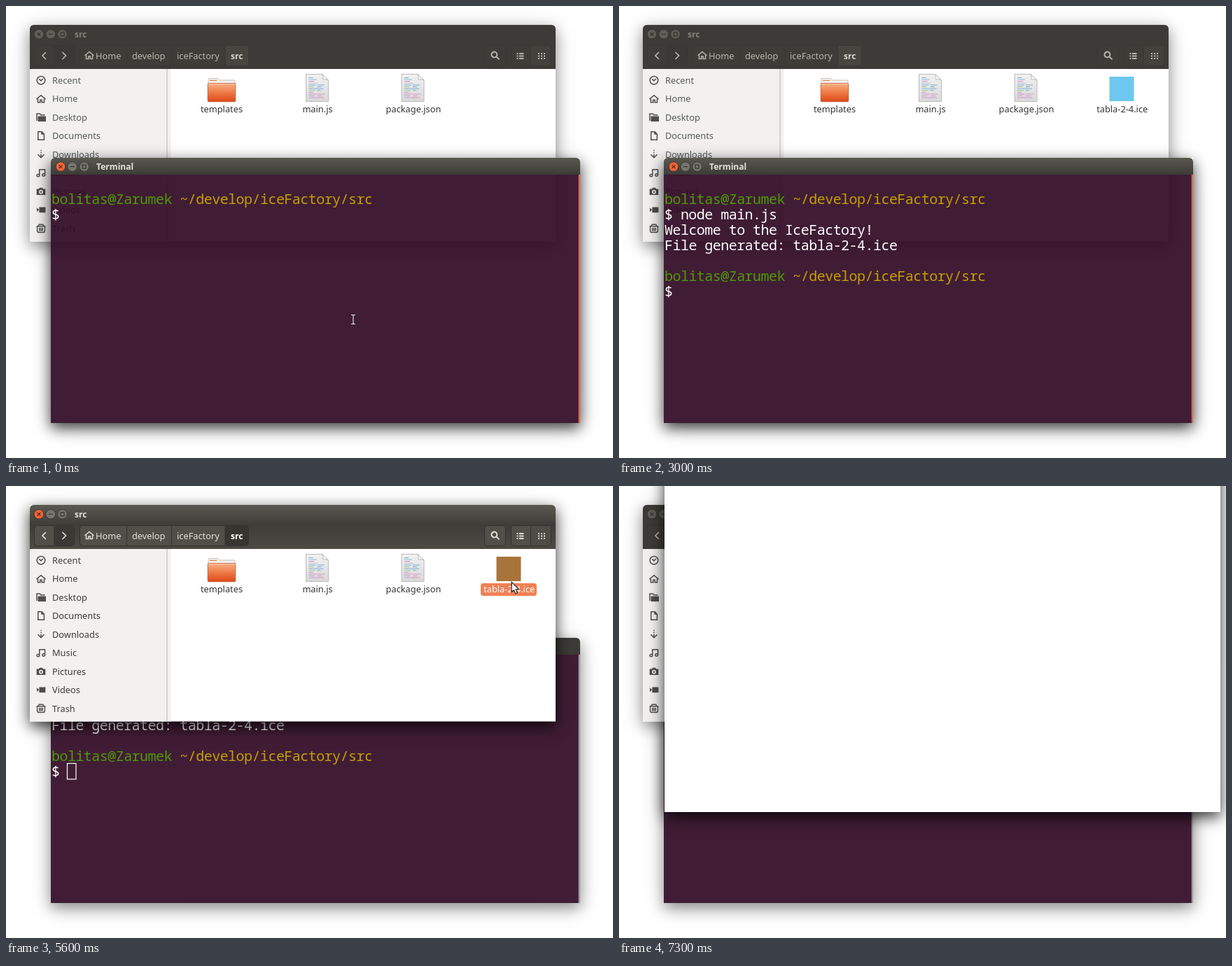
Animation, 867 px wide and 646 px high, one loop 8000 ms. Source, as an HTML page:

```html
<!DOCTYPE html>
<html lang="en">
<head>
<meta charset="utf-8">
<title>Terminal session</title>
<style>
html, body { margin: 0; width: 100%; height: 100%; overflow: hidden; background: #fff; }
svg { display: block; width: 100vw; height: 100vh; }
text { white-space: pre; font: 12.8px "Noto Sans", "Open Sans", sans-serif; }
.bold { font-weight: 700; font-size: 12.1px; }
.mono { font: 20px "Noto Sans Mono", "DejaVu Sans Mono", monospace; letter-spacing: -.54px; }
</style>
</head>
<body>
<svg viewBox="0 0 867 646" preserveAspectRatio="none">
  <defs>
    <filter id="near" x="-20%" y="-30%" width="140%" height="160%"><feGaussianBlur stdDeviation="10"/></filter>
    <filter id="far" x="-20%" y="-30%" width="140%" height="160%"><feGaussianBlur stdDeviation="18"/></filter>
    <linearGradient id="bar" x2="0" y2="1">
      <stop stop-color="#5a5950"/><stop offset=".45" stop-color="#3e3d39"/><stop offset="1" stop-color="#4b4a43"/>
    </linearGradient>
    <linearGradient id="cap" x2="0" y2="1"><stop stop-color="#595850"/><stop offset="1" stop-color="#3c3b37"/></linearGradient>
    <linearGradient id="fold" x2="0" y2="1"><stop stop-color="#f6b286"/><stop offset=".5" stop-color="#ee7a45"/><stop offset="1" stop-color="#dd4818"/></linearGradient>
    <linearGradient id="page" x2="0" y2="1"><stop stop-color="#f1f1f1"/><stop offset="1" stop-color="#d9d9d9"/></linearGradient>
    <clipPath id="body"><path d="M65 0H859V433H65Z"/></clipPath>
  </defs>
  <g id="stage"></g>
</svg>
<script>
const LOOP = 8000, COL = 11.46, ROW = 22;
const TERM = [64, 217, 756, 379], FILES = [34, 27, 751, 309.5], POPUP = [65, -80, 794, 546];
const stage = document.getElementById('stage');
const defs = document.querySelector('defs');

const rect = (x, y, w, h, fill, extra = '') =>
  `<rect x="${x}" y="${y}" width="${w}" height="${h}" fill="${fill}" ${extra}/>`;
const path = (d, fill, stroke = 'none', width = 1, extra = '') =>
  `<path d="${d}" fill="${fill}" stroke="${stroke}" stroke-width="${width}" ${extra}/>`;
const text = (x, y, s, fill, extra = '') => `<text x="${x}" y="${y}" fill="${fill}" ${extra}>${s}</text>`;
const at = (x, y, s) => `<g transform="translate(${x} ${y})">${s}</g>`;
const roundTop = (x, y, w, h, r = 6) =>
  `M${x} ${y + h}V${y + r}q0-${r} ${r}-${r}h${w - 2 * r}q${r} 0 ${r} ${r}v${h - r}Z`;

// Shadows are kept outside their own window, as windows may be translucent.
const outside = (id, [x, y, w, h]) =>
  `<clipPath id="${id}"><path clip-rule="evenodd" d="M-200-200H1100V900H-200ZM${x} ${y}h${w}v${h}h${-w}Z"/></clipPath>`;
defs.innerHTML += outside('oTerm', TERM) + outside('oFiles', FILES) + outside('oPopup', POPUP);

function shadow(id, [x, y, w, h], active) {
  const cast = (blur, opacity) => rect(x, y + 7, w, h, '#000', `filter="url(#${blur})" opacity="${opacity}"`);
  return `<g clip-path="url(#${id})">${cast('far', .14)}${cast('near', active ? .72 : .38)}</g>`;
}

function buttons(x, y, active) {
  const glyphs = ['M-2.3-2.3L2.3 2.3M2.3-2.3L-2.3 2.3', 'M-3 0H3', 'M-2.5-2.5H2.5V2.5H-2.5Z'];
  return glyphs.map((d, i) => {
    const fill = !active ? '#5f5e57' : i ? '#77766e' : '#ee6337';
    return at(x + i * 16.8, y, `<circle r="6.8" fill="${fill}" stroke="#33322e" stroke-width=".8"/>` +
      path(d, 'none', active && !i ? '#5a2313' : '#34332f', 1.2));
  }).join('');
}

const HOME = 'M-6.5.5L0-5 6.5.5M-4.5 0V5H-1.2V1.5H1.2V5H4.5V0';
const places = [
  ['Recent', 'M-5.8 0a5.8 5.8 0 1 0 11.6 0a5.8 5.8 0 1 0-11.6 0M-2.6-1.8L0 .7 2.8-2.2'],
  ['Home', HOME],
  ['Desktop', 'M-6 5V-5.2H-1.5L-.3-3.4H5.5', 'M-4.4-1.6H7V6H-4.4Z'],
  ['Documents', 'M-4.2-5.8H1.2L4.4-2.6V5.8H-4.2ZM1-5.5V-2.5H4'],
  ['Downloads', 'M0-6.3V-4.9M0-3.4V-2M0-.5V4.5M-4.6.2L0 4.8 4.6.2'],
  ['Music', 'M-2.2 3.5V-4.8H5.6V2.8M-6 3.7a1.9 1.7 0 1 0 3.8 0a1.9 1.7 0 1 0-3.8 0M1.8 3a1.9 1.7 0 1 0 3.8 0a1.9 1.7 0 1 0-3.8 0'],
  ['Pictures', '', 'M-6.3-3.4H-3L-2-5.2H2L3-3.4H6.3V5.2H-6.3ZM-2.9.8a2.9 2.9 0 1 0 5.8 0a2.9 2.9 0 1 0-5.8 0M-1.3.8a1.3 1.3 0 1 1 2.6 0a1.3 1.3 0 1 1-2.6 0'],
  ['Videos', '', 'M-2.6-3.8H6.4V4H-2.6ZM-6-3L-2.8 0-6 3Z'],
  ['Trash', 'M-6.4-3H6.4M-3.8-3L-2.8-5.6H2.8L3.8-3M-5.4-3V3.2Q-5.4 5.8-3 5.8H3Q5.4 5.8 5.4 3.2V-3M-2.2-1V4M0-1V4M2.2-1V4']
];

function toolbar(on) {
  const ink = on ? '#e4e0d8' : '#b9b5ad';
  const edge = on ? '#33322e' : '#383732';
  const box = (x, w) => rect(x, 56.5, w, 29, on ? '#504f48' : '#3d3c38', `rx="4" stroke="${edge}"`);
  const split = x => path(`M${x} 57V85`, 'none', edge);
  const line = (d, w = 1.7) => path(d, 'none', ink, w);
  let dots = '';
  for (let i = 0; i < 9; i++) dots += rect(760 + i % 3 * 4, 67 + (i / 3 | 0) * 3.5, 2, 2, ink);
  for (let i = 0; i < 3; i++) dots += rect(729.5, 67 + i * 3.5, 2, 2, ink) + rect(733, 67 + i * 3.5, 6.5, 2, ink);
  return box(40.5, 57) + rect(69, 57, 28, 28, '#3a3935', 'rx="4"') + split(69) +
    box(105.5, 241) + rect(313, 57, 33, 28, on ? '#363530' : '#464540', 'rx="3"') + [172.5, 236.5, 313].map(split).join('') +
    box(683.5, 30) + box(721.5, 57) + rect(750, 57, 28, 28, on ? '#4d4c45' : '#42413c', 'rx="3"') + split(749.5) +
    line('M57 66L52 71 57 76M80.5 66L85.5 71 80.5 76') + at(119, 70.5, line(HOME, 1.5)) +
    text(128, 76, 'Home', ink) + text(180, 76, 'develop', ink) + text(244, 76, 'iceFactory', ink) +
    text(321, 76, 'src', on ? '#fff' : '#d8d4cc', 'class="bold"') +
    line('M693.5 69.5a3.9 3.9 0 1 0 7.8 0a3.9 3.9 0 1 0-7.8 0M700.3 72.4L704.5 76.4', 2) + dots;
}

function sheet(x) {
  const tints = ['#5d9fd0', '#77b4da', '#d77fb4', '#b8b8c4', '#67a6d2', '#7fc58a', '#6aa9d6', '#86c389', '#c78ad0', '#d77fb4', '#a6a0d8', '#c78ad0'];
  let lines = '';
  tints.forEach((c, i) => {
    const split = i > 3 && i < 8;
    lines += rect(x - 12, 102 + i * 2.6, 6 + i * 5 % 8, 1, c);
    if (split || i > 8) lines += rect(x, 102 + i * 2.6, 5 + i * 3 % 7, 1, split ? '#62a3d0' : '#d58bb8');
  });
  return path(`M${x - 16} 97.5H${x + 7}L${x + 16} 106V136.5H${x - 16}Z`, 'url(#page)', '#b4b4b4', .9) +
    `<g opacity=".85">${lines}</g>` +
    path(`M${x + 7} 97.5Q${x + 9} 102 ${x + 8} 105Q${x + 12} 104 ${x + 16} 106Z`, '#fff', '#aaa', .8);
}

const folder = path('M289 114V105Q289 103.5 291 103.5H302L304.5 106H326Q327 106 327 107V114Z', '#f3f1ef', '#b9aea8', .8) +
  path('M291 106.5H301', 'none', '#e5803f', 1.2) +
  rect(288.2, 110.5, 39.6, 26.3, 'url(#fold)', 'rx="1.5" stroke="#c0502a" stroke-width=".8"') +
  path('M289 111.5H327', 'none', '#fbd0b2');

function fileWindow(s) {
  const on = s.focus === 'files';
  const name = (x, label, fill = '#333') => text(x, 152, label, fill, 'text-anchor="middle"');
  const ink = on ? '#3c3c3c' : '#555b58';
  let out = shadow('oFiles', FILES, on) +
    path(roundTop(34, 27, 751, 63), on ? 'url(#bar)' : '#3c3b37') +
    buttons(47, 40.3, on) + text(98, 44.7, 'src', on ? '#e4e0d8' : '#85827b', 'class="bold"') + toolbar(on) +
    rect(34, 90, 751, 246.5, '#fff') + rect(34, 90, 201.5, 246.5, '#f2f1f0') + rect(229.5, 90, 1, 246.5, '#b9b7b5');
  places.forEach(([label, stroke, fill], i) => {
    const y = 106.2 + i * 26.45;
    out += at(50, y, path(stroke, 'none', '#4d4d4d', 1.5) + (fill ? path(fill, '#4d4d4d', 'none', 1, 'fill-rule="evenodd"') : '')) +
      text(66, Math.round(y + 4.7), label, ink);
  });
  out += folder + name(308, 'templates') + sheet(444.5) + name(445, 'main.js') + sheet(581) + name(582, 'package.json');
  if (s.made) {
    out += rect(700.5, 101, 35, 35, s.picked ? '#a8743c' : '#6cc8ee');
    if (s.picked) out += rect(678, 139, 80, 18, '#f08055', 'rx="4"');
    out += name(718.7, 'tabla-2-4.ice', s.picked ? '#fff' : '#333');
  }
  if (s.status) {
    out += path('M573.5 336V316.5Q573.5 314 576 314H785V336Z', '#fff') +
      path('M573.5 336V316.5Q573.5 314 576 314H785', 'none', '#c4c2c0') +
      text(584, 329, '“tabla-2-4.ice” selected  (4,3 kB)', '#444', 'style="font-size:12.7px"');
  }
  return out;
}

function termWindow(s) {
  const on = s.focus === 'term';
  const line = (n, str, fill = '#fff', col = 0) => text(65 + col * COL, 283 + n * ROW, str, fill, 'class="mono"');
  const prompt = n => line(n, 'bolitas@Zarumek', '#4e9a06') + line(n, '~/develop/iceFactory/src', '#c4a000', 16) + line(n + 1, '$');
  let out = shadow('oTerm', TERM, on) +
    path(roundTop(64, 217, 756, 24), on ? 'url(#cap)' : '#3c3b37') +
    buttons(78, 229.6, on) + text(129, 234, 'Terminal', on ? '#e4e0d8' : '#85827b', 'class="bold"') +
    rect(64, 241, 756, 355, '#300a24', 'opacity=".92"') +
    rect(817.7, 241, 2.3, 355, on ? '#dd6a4c' : '#a39c9c') +
    prompt(0) + line(1, s.typed, '#fff', 2);
  if (s.lines > 0) out += line(2, 'Welcome to the IceFactory!');
  if (s.lines > 1) out += line(3, 'File generated: tabla-2-4.ice') + prompt(5);
  const col = s.lines === 1 ? 0 : s.lines ? 2 : 2 + s.typed.length;
  const row = [1, 3, 6][s.lines];
  const x = Math.round(65 + col * COL), y = 265 + row * ROW;
  if (!on) out += rect(x - .5, y - .5, 12.5, 22.5, 'none', 'stroke="#fff" stroke-width="1.2"');
  else if (s.caret) out += rect(x, y, 12, 22, '#fff');
  return out;
}

const desktop = s => s.raised ? termWindow(s) + fileWindow(s) : fileWindow(s) + termWindow(s);

function popup(s) {
  let out = shadow('oPopup', POPUP, true) + rect(65, 0, 794, 466, '#fff');
  if (s.popup === 1) {
    const stale = { ...s, focus: 'files' };
    out += rect(65, 433, 752.7, 33, '#401d35') + rect(817.7, 433, 2.3, 33, '#a39c9c') +
      `<g clip-path="url(#body)">${at(0, 25, desktop(stale))}${rect(65, 0, 785, 23.5, '#3c3b37')}` +
      text(77, 10.8, 'Desktop', '#85827b', 'class="bold" text-anchor="end"') +
      text(433, 10.3, '00:06', '#85827b', 'class="bold" text-anchor="middle"') + '</g>';
  }
  return out;
}

function pointer([kind, x, y]) {
  if (kind === 'beam') {
    const d = 'M-3-6.5H-1Q0-6.5 0-5.5Q0-6.5 1-6.5H3M0-5.5V5.5M-3 6.5H-1Q0 6.5 0 5.5Q0 6.5 1 6.5H3';
    return at(x, y, path(d, 'none', '#2a1422', 2.6) + path(d, 'none', '#fff', 1.1));
  }
  return at(x, y, path('M.7.8V15.2L4 12.2 6.3 17.4 8.9 16.3 6.7 11.2H11Z', '#fff', '#111', 1.1));
}

// Each entry gives a time and the properties that change then.
const beam = (x, y) => ({ mouse: ['beam', x, y] });
const arrow = (x, y) => ({ mouse: ['arrow', x, y] });
const type = typed => ({ typed });
const steps = [
  [0, { focus: 'term', typed: '', lines: 0, caret: false, popup: 0, ...beam(496, 448) }],
  [200, { caret: true }], [300, { mouse: null }],
  [400, type('n')], [500, type('no')], [600, type('nod')], [700, type('node')], [800, type('node ')],
  [1000, type('node m')], [1100, type('node ma')], [1200, type('node mai')], [1300, type('node main.js ')],
  [1900, { caret: false }],
  [2100, { lines: 1, caret: true }], [2200, { lines: 2, made: true }],
  [3000, { caret: false }],
  [3100, beam(585, 412)], [3200, beam(610.5, 380.5)],
  [3400, beam(672, 310)], [3500, arrow(736, 228)], [3600, arrow(777, 179)],
  [3800, { caret: true, ...arrow(780, 163) }], [3900, arrow(780, 145)], [4000, arrow(779, 128)],
  [4100, arrow(780, 112)], [4200, arrow(780, 98)], [4300, { caret: false, ...arrow(780, 91) }],
  [4500, { caret: true, ...arrow(673, 87) }],
  [4700, arrow(683, 95)], [4800, arrow(702, 110)], [4900, arrow(721, 125)], [5000, arrow(731, 135)],
  [5100, { caret: false, ...arrow(726, 138) }],
  [5400, { focus: 'files', raised: true }], [5500, { picked: true }], [5600, arrow(721.5, 136.5)],
  [5800, arrow(716, 131)], [6000, { status: true, ...arrow(720, 134) }],
  [6800, { focus: '', popup: 1, ...arrow(721, 137) }],
  [7100, { popup: 2, ...arrow(717, 132) }], [7300, { mouse: null }]
];

let shown = -1;
function render(t) {
  const n = steps.filter(([start]) => start <= t).length;
  if (n === shown) return;
  shown = n;
  const s = Object.assign({}, ...steps.slice(0, n).map(step => step[1]));
  stage.innerHTML = rect(0, 0, 867, 646, '#fff') + desktop(s) +
    (s.popup ? popup(s) : '') + (s.mouse ? pointer(s.mouse) : '');
}

const begin = performance.now();
function tick() {
  render((performance.now() - begin) % LOOP);
  requestAnimationFrame(tick);
}
render(0);
tick();
</script>
</body>
</html>
```
